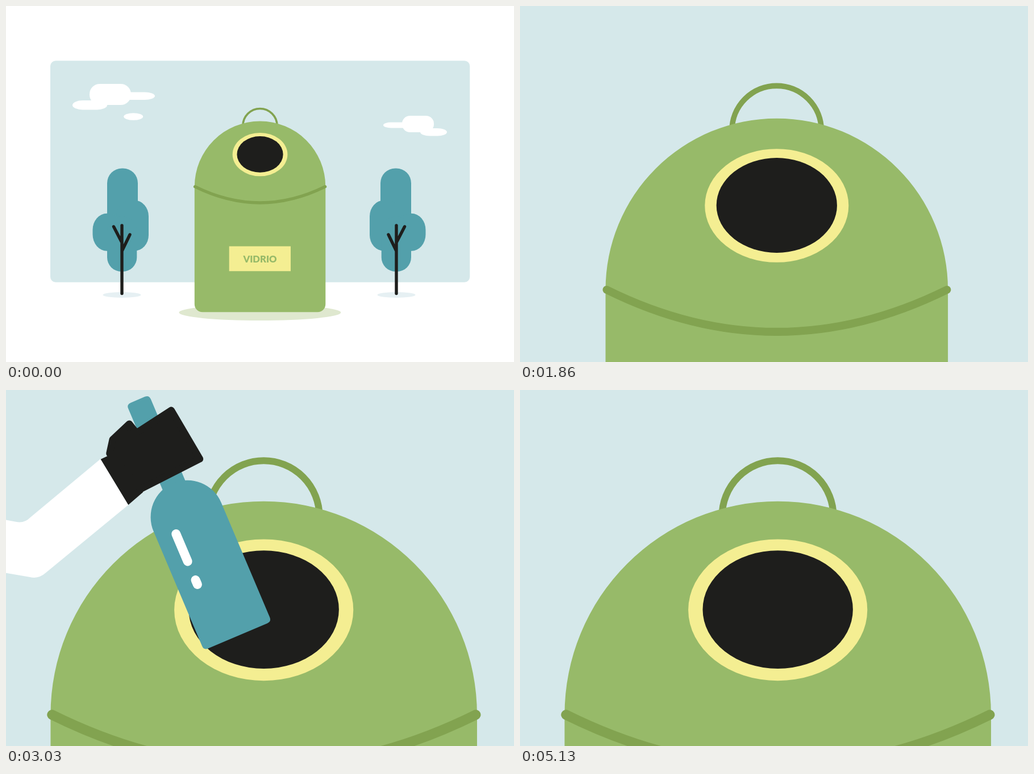
An HTML page with a canvas for the animation above (5850 ms loop, 894 by 626 pixels).

```html
<!DOCTYPE html>
<html lang="es">
<head>
<meta charset="utf-8">
<title>Vidrio</title>
<style>
  html, body { margin: 0; width: 100%; height: 100%; overflow: hidden; background: #fff; }
  canvas { display: block; width: 100%; height: 100%; }
</style>
</head>
<body>
<canvas id="stage" width="894" height="626"></canvas>
<script>
const LOOP = 5850, ZOOM = 3.256, RELEASE = 3240;
const SKY = '#d5e8ea', TEAL = '#53a0ab', INK = '#1e1e1c', GREEN = '#97ba69',
  RIM = '#82a350', YELLOW = '#f4ee92', WHITE = '#fff';

const ctx = document.getElementById('stage').getContext('2d');

const clamp = v => Math.max(0, Math.min(1, v));
const span = (t, from, to) => clamp((t - from) / (to - from));
const smooth = u => u * u * (3 - 2 * u);

// cubic-bezier(x1, 0, x2, 1)
function bezier(u, x1, x2) {
  let lo = 0, hi = 1;
  for (let i = 0; i < 24; i++) {
    const s = (lo + hi) / 2, r = 1 - s;
    if (3 * r * r * s * x1 + 3 * r * s * s * x2 + s ** 3 < u) lo = s; else hi = s;
  }
  return smooth(lo);
}

function shape(color, d) {
  ctx.fillStyle = color;
  ctx.fill(new Path2D(d));
}

function line(color, width, d) {
  ctx.strokeStyle = color;
  ctx.lineWidth = width;
  ctx.stroke(new Path2D(d));
}

function oval(color, x, y, rx, ry) {
  ctx.fillStyle = color;
  ctx.beginPath();
  ctx.ellipse(x, y, rx, ry, 0, 0, 7);
  ctx.fill();
}

function box(color, x, y, w, h, rx = 0, ry = rx) {
  ctx.fillStyle = color;
  ctx.beginPath();
  ctx.roundRect(x, y, w, h, { x: Math.min(rx, w / 2), y: Math.min(ry, h / 2) });
  ctx.fill();
}

function turn(degrees, x = 0, y = 0) {
  ctx.translate(x, y);
  ctx.rotate(degrees * Math.PI / 180);
  ctx.translate(-x, -y);
}

// runs a drawing step without leaking its transform or clip
function group(step) {
  ctx.save();
  step();
  ctx.restore();
}

function tree() {
  oval('#e6f0f3', 204, 508, 33.5, 5);
  box(TEAL, 178, 285.5, 54, 140, 26);
  box(TEAL, 152.5, 364.7, 52, 66, 25, 29);
  box(TEAL, 194, 341.7, 57, 89, 25, 28);
  box(TEAL, 178, 370, 52.3, 97, 25);
  line(INK, 5.4, 'M204 386V505.500M204 416L189.500 388M204 431L218 402');
}

function clouds() {
  box(WHITE, 147, 137, 73, 37, 18);
  box(WHITE, 195, 151.5, 67, 13.5, 18);
  box(WHITE, 117, 166, 61, 16.5, 18);
  oval(WHITE, 224.2, 194.5, 17, 6.3);
  box(WHITE, 697, 193, 56, 29, 14);
  box(WHITE, 664, 204.5, 50, 10, 14);
  box(WHITE, 729, 215, 47, 13.5, 17);
}

function bin() {
  oval('#dfe8cf', 446.9, 539, 142.5, 14);
  line(RIM, 3.7, 'M416.900 210.600a30.100 30.100 0 0 1 60.200 0');
  shape(GREEN, 'M331.800 317.700a115.250 115.250 0 0 1 230.500 0V524.300a14 14 0 0 1-14 14H345.800a14 14 0 0 1-14-14Z');
  line(RIM, 5.4, 'M332.600 317.700Q447 374.300 561.600 317.700');
  oval(YELLOW, 447.05, 261.1, 48.4, 38.2);
  oval(INK, 447.05, 260.9, 40.6, 31.9);
  box(YELLOW, 392.7, 422.5, 108.3, 43.7);
  ctx.fillStyle = GREEN;
  ctx.font = '900 16.6px Lato, "Open Sans", sans-serif';
  ctx.textAlign = 'center';
  ctx.fillText('VIDRIO', 447, 451.3);
}

function scene(scale) {
  ctx.translate(444.1, 205.4);
  ctx.scale(scale, scale);
  ctx.translate(-444.1, -205.4);
  box(SKY, 78, 96.3, 738.3, 389.5, 9.5);
  clouds();
  tree();
  group(() => {
    ctx.translate(891, 0);
    ctx.scale(-1, 1);
    tree();
  });
  bin();
}

// the whole arm and its load, swung back from the drop position
function pose(away) {
  ctx.translate(-away, -away * 23 / 258);
  turn(-away * 10.5 / 258, 283, 208);
}

function gripPose() {
  ctx.translate(258, 23);
  turn(10.5, 25, 185);
}

function bottle(away, fall) {
  // visible above the hole, through it, and on the near left side of the bin
  const mouth = new Path2D('M-400-400H894V386H369L457 626H-400Z');
  mouth.ellipse(453.6, 386, 132.2, 104, 0, 0, 7);
  ctx.clip(mouth);
  pose(away);
  gripPose();
  ctx.translate(246.8, 387.4);
  turn(-30.7);
  ctx.translate(fall * .04, fall);
  shape(TEAL, 'M-21.500-270V-443q0-8 8-8H13.500q8 0 8 8V-270Z');
  shape(TEAL, 'M-64.700-227a64.700 64.700 0 0 1 129.400 0V-8q0 8-8 8H-56.700q-8 0-8-8Z');
  line(WHITE, 16, 'M-30-207.500V-155M-30-119.500V-111');
}

function fist() {
  gripPose();
  const fingers = 'M77.500 10L139 88L43 154.500L-20 100L-18 75L7.500 43.500L22 57.500Z';
  shape(INK, 'M25 185L-34 112L0 90L60 120L47 160Z');
  shape(INK, fingers);
  line(INK, 12, fingers);
}

function openHand() {
  shape(INK, 'M238 125L256 112L306 72L371 50L386 77L402 104L407 113L412 136L308 187L304 193L283 208Z');
  line(INK, 22, 'M262.500 104.500L304.700 54');
  line(INK, 21, 'M316 77L389 23.500M365 78L420.500 41.500M380 105L436 72.500M396 132L436 111.500');
}

function arm(away, back, hand) {
  ctx.translate(-back, 0);
  pose(away);
  shape(WHITE, 'M238 125L110 221.500Q99 232 84 228.300L-900-8V104L104 326.500Q119 331 132 320.500L283 208Z');
  hand();
}

function draw(t) {
  const scale = 1 + (ZOOM - 1) * bezier(span(t, 1530, 2100), .313, .522);
  const away = 686 * (1 - smooth(span(t, 2160, RELEASE)));
  const fall = Math.min(620, .00213 * Math.max(0, t - RELEASE) ** 2);
  const back = Math.min(700, 117 * (Math.max(0, t - 3490) / 380) ** 2);

  ctx.lineCap = ctx.lineJoin = 'round';
  box(WHITE, 0, 0, 894, 626);
  group(() => scene(scale));
  group(() => bottle(away, fall));
  group(() => arm(away, back, t < RELEASE ? fist : openHand));
}

let start;
function tick(now) {
  start ??= now;
  draw((now - start) % LOOP);
  requestAnimationFrame(tick);
}
draw(0);
requestAnimationFrame(tick);
</script>
</body>
</html>
```
